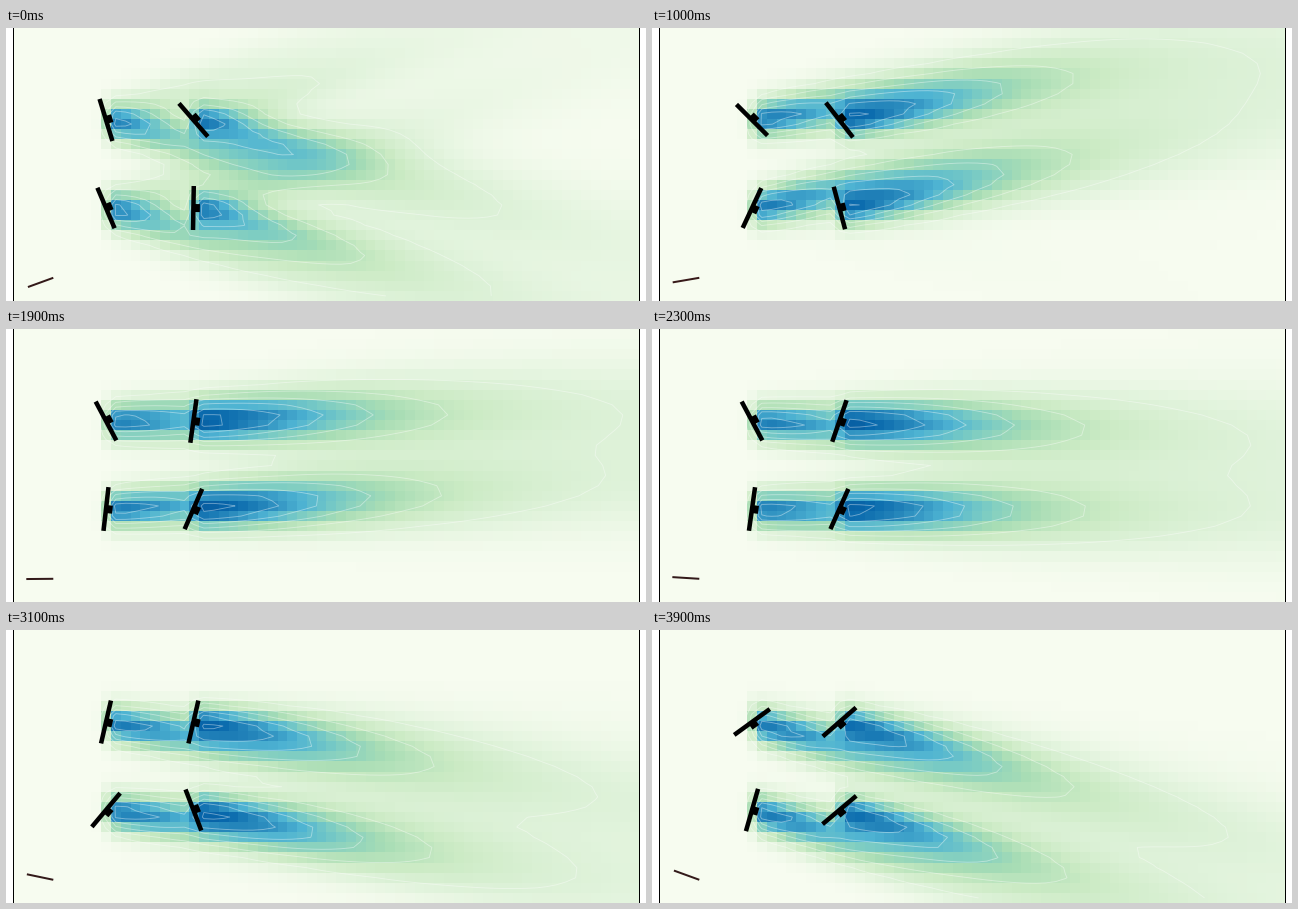
Animation of 640 by 273 pixels, one loop 4 s. Source, as a matplotlib script:

```python
from itertools import product

import numpy as np
import matplotlib.pyplot as plt
from matplotlib.animation import FuncAnimation
from matplotlib.patches import Rectangle

W, H, DPI = 640, 273, 100
FRAMES, INTERVAL = 40, 100
LEFT, RIGHT = 7, 633.5
COLS, ROWS = 64, 27
PX = 72 / DPI                # points per pixel
MEMORY = 0.72                # share of the flow kept from step to step
STRENGTH = 0.82              # speed deficit right behind a rotor
LEVELS = np.arange(1, 7) / 7

TURBINES = list(product((92, 180), (100, 187.4)))    # (y, x)
POSE_AT = (0, 6, 10, 15, 23, 31, 39)
POSES = [(17, 49, 45, 28, 28, -13, -54),             # yaw in degrees
         (41, -25, 38, 3, -19, -13, -49),
         (23, 31, -25, -5, -8, -40, -16),
         (-1, -7, 15, -23, -24, 21, -50)]

xs = LEFT + (np.arange(COLS) + 0.5) * (RIGHT - LEFT) / COLS
ys = (np.arange(ROWS) + 0.5) * H / ROWS
X, Y = np.meshgrid(xs, ys)


def wind(n):
    return 20 - 40 * n / (FRAMES - 1)


def yaws(n):
    return [np.interp(n, POSE_AT, pose) for pose in POSES]


def wake(x, y, angle):
    """Gaussian wake that widens and fades downstream."""
    a = np.radians(angle)
    dx, dy = X - x, Y - y - 0.7
    along = np.maximum(dx * np.cos(a) - dy * np.sin(a), 0)
    across = dx * np.sin(a) + dy * np.cos(a)
    sigma = 12.5 + 0.04 * along
    onset = 1 / (1 + np.exp(-np.clip((dx - 0.5) / 2.5, -40, 40)))
    fade = 1 / (1 + (along / 147) ** 2)
    return STRENGTH * onset * fade * np.exp(-(across / sigma) ** 2 / 2)


def steady_flow(n):
    """Wakes of all rotors; a rotor turned off the wind bends its wake."""
    speed = 1
    for (y, x), yaw in zip(TURBINES, yaws(n)):
        angle = 0.9 * wind(n) - 0.06 * (yaw - wind(n))
        speed = speed * (1 - wake(x, y, angle))
    return 1 - speed


steady = [steady_flow(n) for n in range(FRAMES)]


def flow(n):
    """Flow that lags behind the wind, wrapping round the loop."""
    return sum((1 - MEMORY) * MEMORY ** k * steady[(n - k) % FRAMES]
               for k in range(FRAMES))


fig = plt.figure(figsize=(W / DPI, H / DPI), dpi=DPI, facecolor="white")
ax = fig.add_axes([0, 0, 1, 1])
ax.axis("off")

image = ax.imshow(steady[0], cmap="GnBu", vmin=0, vmax=1, aspect="auto",
                  interpolation="nearest", extent=(LEFT, RIGHT, H, 0))
for edge in (7, 633):
    ax.add_patch(Rectangle((edge, 0), 1, H, fc="black", lw=0,
                           antialiased=False, zorder=5))


def bar(width):
    return ax.plot([], [], color="black", lw=width * PX,
                   solid_capstyle="butt", zorder=4)[0]


rotors = [bar(4.5) for _ in TURBINES]
nacelles = [bar(8) for _ in TURBINES]
vane = bar(2)
ax.set_xlim(0, W)
ax.set_ylim(H, 0)
contours = []


def draw(n):
    field = flow(n)
    image.set_data(field)
    while contours:
        contours.pop().remove()
    contours.append(ax.contour(X, Y, field, levels=LEVELS, colors="white",
                               linewidths=0.9 * PX, alpha=0.4, zorder=2))

    for (y, x), yaw, rotor, nacelle in zip(TURBINES, yaws(n),
                                           rotors, nacelles):
        a = np.radians(yaw)
        c, s = np.cos(a), np.sin(a)
        rotor.set_data([x - 22 * s, x + 22 * s], [y - 22 * c, y + 22 * c])
        nacelle.set_data([x, x + 6.5 * c], [y, y - 6.5 * s])

    a = np.radians(wind(n))
    vane.set_data([47.3 - 27 * np.cos(a), 47.3],
                  [249.8 + 27 * np.sin(a), 249.8])
    flash = np.exp(-((n - 6) / 2) ** 2)
    vane.set_color((0.2 + 0.8 * flash, 0.1 * (1 - flash), 0.1 * (1 - flash)))
    return [image, vane, *rotors, *nacelles]


anim = FuncAnimation(fig, draw, frames=FRAMES, interval=INTERVAL,
                     repeat=True, repeat_delay=0, blit=False)
plt.show()
```
